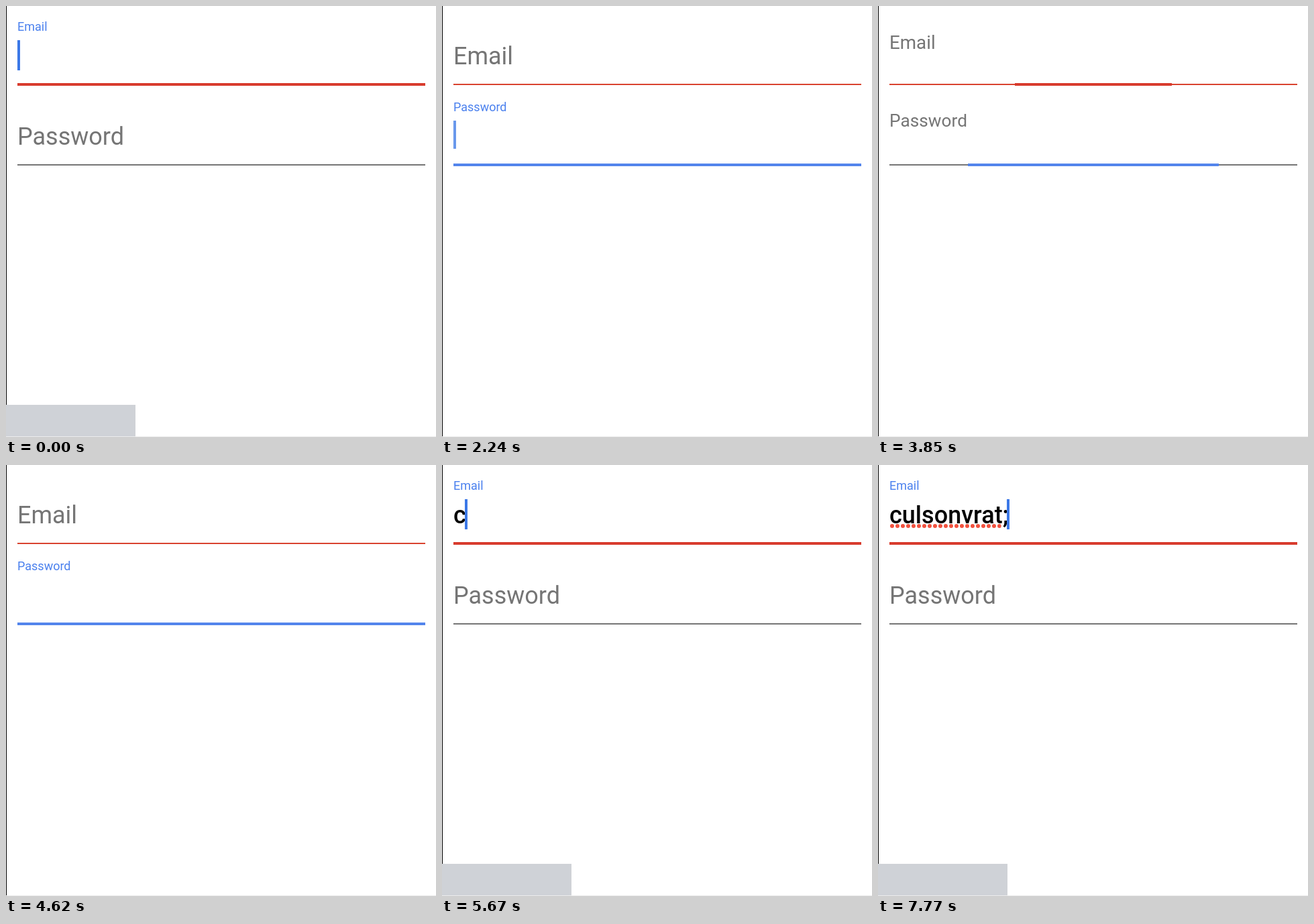
Recreate the animation shown at these times as an HTML page with a canvas. Size 641 px wide and 643 px high, loop 8 s.

```html
<!DOCTYPE html>
<html lang="en">
<head>
<meta charset="utf-8">
<title>Floating label form</title>
<style>
  html, body { margin: 0; width: 100%; height: 100%; overflow: hidden; background: #fff; }
  canvas { display: block; width: 641px; height: 643px; }
</style>
</head>
<body>
<canvas id="stage" width="641" height="643"></canvas>
<script>
const ctx = document.getElementById('stage').getContext('2d');
const LOOP = 8000, STEP = 70, MOVE = 200, LABEL_LAG = 6.6;
const LEFT = 17, RIGHT = 625;
const GRAY = '#757575', RED = '#d83c2e', BLUE = '#5385ec', LABEL_BLUE = '#4a80ee', CARET = '#3b78e7';

// Focus alternates between the fields; the caret and tint return once settled.
const moves = [
  { start: 1327, settle: 1680 },
  { start: 2766, settle: 3150 },
  { start: 3770, settle: 4130 },
  { start: 5076, settle: 5460 }
];
const blinks = [210, 700, 1190, 1610, 2240, 3080, 3570, 4060, 4550, 5390];
const barFades = [[1190, 1260], [2380, 2590], [3570, 3780], [4690, 4900]];
const word = 'culsonvrat;';
const keyTimes = [5670, 5950, 6090, 6230, 6510, 6650, 6930, 7210, 7280, 7560, 7770];

const clamp = v => Math.max(0, Math.min(1, v));

// cubic-bezier(.4, 0, .2, 1)
function ease(x) {
  if (x <= 0 || x >= 1) return clamp(x);
  let lo = 0, hi = 1, u;
  for (let i = 0; i < 24; i++) {
    u = (lo + hi) / 2;
    const v = 1 - u;
    if (1.2 * u * v * v + 0.6 * u * u * v + u * u * u < x) lo = u; else hi = u;
  }
  return u * u * (3 - 2 * u);
}

// 0 = email focused, 1 = password focused
const focusAt = t => moves.reduce((sum, m, i) =>
  sum + (i % 2 ? -1 : 1) * ease((t - m.start) / MOVE), 0);

const barAlpha = t => barFades.reduce((sum, [a, b], i) =>
  sum + (i % 2 ? 1 : -1) * clamp((t - a) / (b - a)), 1);

function caretAlpha(t) {
  const past = blinks.filter(b => b <= t);
  const on = past.length % 2 === 0;
  const fading = past.length && t - past[past.length - 1] < STEP;
  return fading ? (on ? 0.6 : 0.76) : +on;
}

function rect(color, x, y, w, h) {
  ctx.fillStyle = color;
  ctx.fillRect(x, y, w, h);
}

function text(str, x, y, size, color, weight = 400) {
  ctx.font = `${weight} ${size}px Roboto, sans-serif`;
  ctx.fillStyle = color;
  ctx.fillText(str, x, y);
}

function field(name, top, focus, labelFocus, active, thin, thick) {
  text(name, LEFT, top + 87 - 50 * labelFocus, 36 - 18 * labelFocus, active ? LABEL_BLUE : GRAY);
  rect(thin, LEFT, top + 116, RIGHT - LEFT, 2);
  const w = Math.round((RIGHT - LEFT) / 2 * focus) * 2;
  rect(thick, (LEFT + RIGHT - w) / 2, top + 115, w, 4);
}

function squiggle(width) {
  ctx.save();
  ctx.beginPath();
  ctx.rect(LEFT, 86, width - 2, 10);
  ctx.clip();
  ctx.fillStyle = '#f2523f';
  for (let x = 21; x < LEFT + width; x += 8) {
    ctx.beginPath();
    ctx.arc(x, 91, 3, 0, Math.PI * 2);
    ctx.fill();
  }
  ctx.restore();
}

function draw(t) {
  rect('#fff', 0, 0, 641, 643);
  rect('#000', 0, 0, 1, 642);
  rect('#ececec', 0, 642, 641, 1);
  ctx.globalAlpha = barAlpha(t);
  rect('#cfd2d7', 0, 595, 193, 47);
  ctx.globalAlpha = 1;

  const focus = focusAt(t), labelFocus = focusAt(t - LABEL_LAG);
  const settled = !moves.some(m => t >= m.start && t < m.settle);
  const onPassword = focus > 0.5;
  field('Email', 0, 1 - focus, 1 - labelFocus, settled && !onPassword, '#d9432f', RED);
  field('Password', 120, focus, labelFocus, settled && onPassword, GRAY, BLUE);

  const typed = word.slice(0, keyTimes.filter(k => k <= t).length);
  let caretX = LEFT;
  if (typed) {
    ctx.font = '500 36px Roboto, sans-serif';
    caretX = Math.round(LEFT + ctx.measureText(typed).width - 2);
    if (typed === word) squiggle(ctx.measureText(word.slice(0, -1)).width);
    text(typed, LEFT, 87, 36, '#000', 500);
  }
  if (settled) {
    ctx.globalAlpha = caretAlpha(t);
    rect(CARET, caretX, onPassword ? 171 : 51, 4, onPassword ? 42 : 45);
    ctx.globalAlpha = 1;
  }
}

const origin = performance.now();
function tick() {
  const t = (performance.now() - origin) % LOOP;
  draw(Math.floor(t / STEP) * STEP);
  requestAnimationFrame(tick);
}
tick();
</script>
</body>
</html>
```
